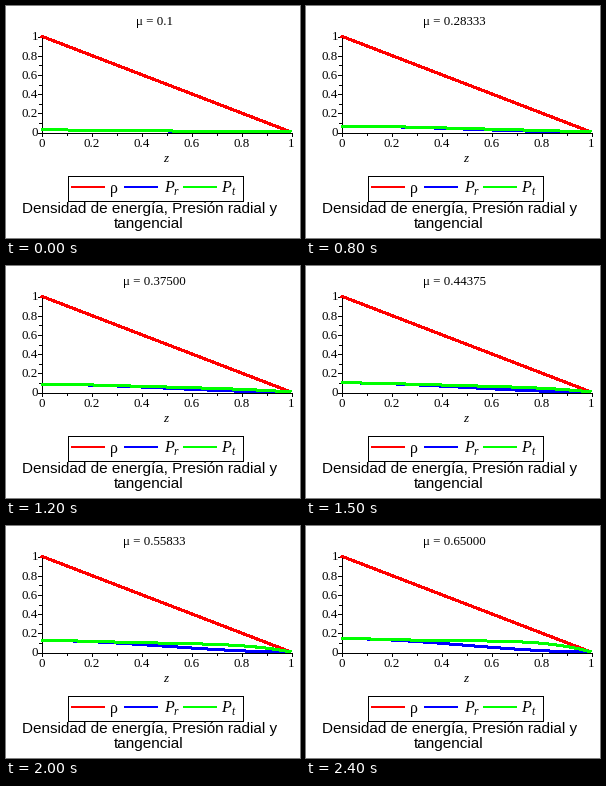
A matplotlib script for the animation above (2500 ms loop, 294 by 232 pixels).

```python
import numpy as np
import matplotlib.pyplot as plt
from matplotlib.animation import FuncAnimation
from matplotlib.patches import Rectangle

W, H = 294, 232
DPI = 128  # a power of two keeps the pixel size exact
FRAMES, INTERVAL = 25, 100
MU_MIN, MU_MAX = 0.1, 0.65
X0, X1, Y0, Y1 = 35, 285, 126, 30  # plot corners in pixels
RED, BLUE, GREEN = "#ff0000", "#0000ff", "#00ff00"
SERIF, SANS = "Liberation Serif", "Liberation Sans"


def pt(px):
    return px * 72 / DPI


def to_px(z, v):
    return X0 + (X1 - X0) * z, Y0 + (Y1 - Y0) * v


fig = plt.figure(figsize=(W / DPI, H / DPI), dpi=DPI, facecolor="white")
ax = fig.add_axes([0, 0, 1, 1])
ax.set_xlim(0, W)
ax.set_ylim(H, 0)
ax.axis("off")


def text(x, y, s, size=13, font=SERIF, ha="center", style="normal"):
    return ax.text(x, y, s, fontsize=pt(size), family=font, ha=ha,
                   va="baseline", style=style, color="black")


def rule(xs, ys):
    ax.plot(xs, ys, color="black", lw=pt(1), antialiased=False,
            solid_capstyle="butt", zorder=1)


def curve(color, xs=(), ys=()):
    return ax.plot(xs, ys, color=color, lw=pt(2), antialiased=False,
                   solid_capstyle="butt", zorder=3)[0]


def draw_axes():
    rule([X0, X1 + 1], [Y0 + 0.5] * 2)
    rule([X0 + 0.5] * 2, [Y1, Y0 + 1])
    for i in range(11):
        x, y = to_px(i / 10, i / 10)
        size = 2 if i % 2 else 3
        rule([int(x) + 0.5] * 2, [Y0 + 1, Y0 + 1 + size])
        rule([X0 - size, X0], [int(y) + 0.5] * 2)
        if i % 2 == 0:
            label = f"{i / 10:g}"
            text(x + 0.5, 141, label)
            text(32, y + 4.5, label, ha="right")
    text(159.5, 156, "z", style="italic")


def draw_legend():
    ax.add_patch(Rectangle((61.5, 169.5), 175, 25, fill=False, ec="black",
                           lw=pt(1), antialiased=False))
    for x, color in ((65, RED), (118, BLUE), (177, GREEN)):
        curve(color, [x, x + 34], [181, 181])
    text(104, 187, "ρ", 16, ha="left")
    for x, sub in ((158, "r"), (215, "t")):
        text(x, 186, "P", 16, ha="left", style="italic")
        text(x + 10, 189, sub, 11.5, ha="left", style="italic")


def pressures(z, mu):
    radial = 0.215 * mu * (1 - z) ** 2 * (1 + 2 * z)
    anisotropy = 0.75 * (mu / MU_MAX) ** 2.5 * z ** 3 * (1 - z)
    return radial, radial + anisotropy


draw_axes()
draw_legend()
text(143.5, 207, "Densidad de energía, Presión radial y", 15.3, SANS)
text(142.5, 222, "tangencial", 15.3, SANS)

z = np.linspace(0, 1, 101)
curve(RED, *to_px(z, 1 - z))
radial_line = curve(BLUE)
tangential_line = curve(GREEN)
title = text(148.5, 19, "")


def update(k):
    mu = MU_MIN + (MU_MAX - MU_MIN) * k / (FRAMES - 1)
    radial, tangential = pressures(z, mu)
    radial_line.set_data(*to_px(z, radial))
    tangential_line.set_data(*to_px(z, tangential))
    title.set_text(f"μ = {mu:.5f}" if k else f"μ = {mu:g}")
    return radial_line, tangential_line, title


anim = FuncAnimation(fig, update, frames=FRAMES, interval=INTERVAL,
                     repeat=True, repeat_delay=0)
plt.show()
```
